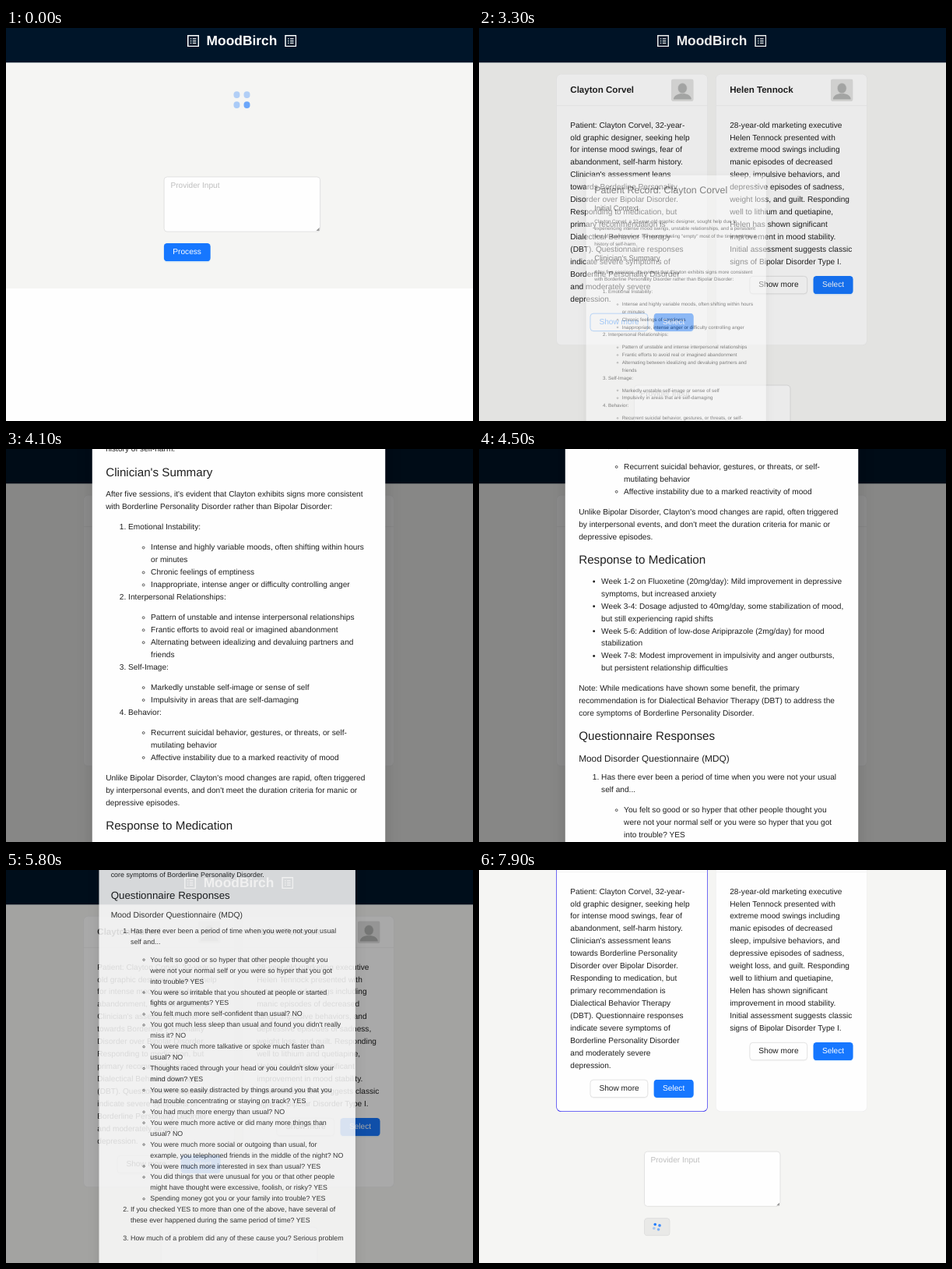
Write an HTML page that moves like this. It is 600 px wide and 504 px high and loops after 8 s.

```html
<!DOCTYPE html>
<html lang="en">
<head>
<meta charset="utf-8">
<style>
html, body { margin: 0; width: 600px; height: 504px; overflow: hidden; background: #fefefe; }
* { box-sizing: border-box; }
#stage {
  position: absolute; left: 0; top: 0; width: 830px; height: 700px; overflow: hidden;
  transform: translateY(-2px) scale(.724); transform-origin: 0 0;
  color: rgba(0,0,0,.88); white-space: nowrap;
  font: 14px/1.5714 "Liberation Sans", Arial, sans-serif; text-rendering: geometricPrecision;
}
#page, #mask, #modal, .card, .abs { position: absolute; }
#page { left: 0; top: 0; width: 830px; height: 833px; }
#back { left: 0; top: 0; width: 830px; background: #f5f5f3; }
#bar { left: 0; top: 0; width: 830px; height: 64px; background: #001529; }
#brand { left: 316px; top: 0; width: 194px; color: #fff; }
#brand b { position: absolute; left: 0; width: 194px; top: 7px; text-align: center; font-size: 24px; }
#brand svg { position: absolute; top: 14.5px; width: 21.5px; height: 21.5px; }
.card { top: 85px; width: 267px; height: 479px; border-radius: 8px; background: #fefefe; box-shadow: 0 0 0 1px #f0f0f0; }
.card.on { box-shadow: 0 0 0 1px #4038f0; }
.head { height: 56px; margin-bottom: -1px; padding: 0 24px; border-bottom: 1px solid #f0f0f0; display: flex; align-items: center; justify-content: space-between; font-weight: bold; font-size: 16px; }
.body { padding: 24px; }
.row { display: flex; justify-content: flex-end; gap: 10px; margin-top: 14px; }
.btn { height: 32px; padding: 4px 15px; border: 1px solid #d9d9d9; border-radius: 6px; background: #fefefe; box-shadow: 0 2px 0 rgba(0,0,0,.02); }
.btn.hover { color: #4096ff; border-color: #4096ff; }
.btn.main { color: #fff; border-color: transparent; background: #1677ff border-box; box-shadow: 0 2px 0 rgba(5,145,255,.1); }
.btn.main.hover { background-color: #4096ff; }
.pick.hover { box-shadow: 0 1px 7px rgba(40,90,150,.35) !important; }
#area { height: 98px; padding: 4px 11px; border: 1px solid #d9d9d9; border-radius: 6px; background: #fefefe; color: rgba(0,0,0,.25); }
#area::after { content: ""; position: absolute; right: 2px; top: 90px; width: 6px; height: 6px; background: linear-gradient(135deg, transparent 55%, #999 56%); }
#go { top: 118px; left: 0; }
#busy { top: 118px; left: 0; width: 46px; height: 32px; border-radius: 6px; background: #e9e9e7; box-shadow: inset 0 0 0 1px #d9d9d9; }
.spin i { position: absolute; border-radius: 50%; background: #1677ff; }
#mask { inset: 0; background: rgba(0,0,0,.45); }
#modal { left: 153px; top: 100px; width: 520px; min-height: 2072px; padding: 20px 24px; border-radius: 8px; background: #fefefe; box-shadow: 0 6px 16px rgba(0,0,0,.08), 0 3px 6px -4px rgba(0,0,0,.12), 0 9px 28px 8px rgba(0,0,0,.05); }
#modal > svg { position: absolute; left: 485.5px; top: 22px; }
h1, h2, h3 { margin: 0 0 .5em; font-weight: normal; }
h1 { font-size: 2em; } h2 { font-size: 1.5em; } h3 { font-size: 1.17em; }
p, ol, ul { margin: 0 0 1em; }
ol, ul { padding-left: 40px; }
li ul { margin: 0; }
</style>
</head>
<body>
<svg width="0" height="0" style="position:absolute">
  <symbol id="sheet" viewBox="0 0 31 31">
    <path d="M2 2h27v27H2z" fill="none" stroke="#fff" stroke-width="3"/>
    <path d="M8 10h3m-3 5.5h3m-3 5.5h3m3-11h9m-9 5.5h9m-9 5.5h9" stroke="#fff" stroke-width="2.4"/>
  </symbol>
  <symbol id="face" viewBox="0 0 29 29">
    <rect width="29" height="29" rx="3.5" fill="#e1e1e0"/>
    <path d="M3 26.3c0-10 23-10 23 0z" fill="#b0b1b0"/>
    <ellipse cx="14.5" cy="12" rx="6" ry="6.7" fill="#b0b1b0" stroke="#e1e1e0" stroke-width=".6"/>
  </symbol>
</svg>
<div id="stage">
  <div id="page">
    <div id="back" class="abs"></div>
    <div id="bar" class="abs"></div>
    <div id="brand" class="abs">
      <svg style="left:0"><use href="#sheet"/></svg><b>MoodBirch</b><svg style="right:0"><use href="#sheet"/></svg>
    </div>
    <div id="cards"></div>
    <div id="loader" class="spin abs" style="left:418.5px;top:130px"></div>
    <div id="form" class="abs">
      <div id="area">Provider Input</div>
      <div id="go" class="btn main abs">Process</div>
      <div id="busy" class="abs"><div id="dots" class="spin abs" style="left:23px;top:16px"></div></div>
    </div>
  </div>
  <div id="mask"></div>
  <div id="modal"></div>
</div>
<script>
const $ = id => document.getElementById(id);
const br = s => s.replaceAll('|', '<br>');
const p = s => `<p>${br(s)}</p>`;
const ul = (...items) => `<ul>${items.map(s => `<li>${br(s)}</li>`).join('')}</ul>`;
const li = (s, ...sub) => `<li>${p(s)}${sub.length ? ul(...sub) : ''}</li>`;

const card = (id, x, name, text) => `<div class="card" id="${id}" style="left:${x}px">
  <div class="head">${name}<svg width="40" height="40"><use href="#face"/></svg></div>
  <div class="body">${br(text)}<div class="row"><div class="btn more">Show more</div><div class="btn main pick">Select</div></div></div></div>`;

$('cards').innerHTML =
  card('first', 138, 'Clayton Corvel', 'Patient: Clayton Corvel, 32-year-|old graphic designer, seeking help|for intense mood swings, fear of|abandonment, self-harm history.|Clinician\'s assessment leans|towards Borderline Personality|Disorder over Bipolar Disorder.|Responding to medication, but|primary recommendation is|Dialectical Behavior Therapy|(DBT). Questionnaire responses|indicate severe symptoms of|Borderline Personality Disorder|and moderately severe|depression.') +
  card('second', 421, 'Helen Tennock', '28-year-old marketing executive|Helen Tennock presented with|extreme mood swings including|manic episodes of decreased|sleep, impulsive behaviors, and|depressive episodes of sadness,|weight loss, and guilt. Responding|well to lithium and quetiapine,|Helen has shown significant|improvement in mood stability.|Initial assessment suggests classic|signs of Bipolar Disorder Type I.');

$('modal').innerHTML = `<svg width="13" height="13"><path d="M1 1l11 11m0-11l-11 11" stroke="#8c8c8c" stroke-width="1.5"/></svg>
<h1>Patient Record: Clayton Corvel</h1>
<h2>Initial Context</h2>
${p('Clayton Corvel, a 32-year-old graphic designer, sought help due to|experiencing intense mood swings, unstable relationships, and a persistent|fear of abandonment. He reports feeling "empty" most of the time and has a|history of self-harm.')}
<h2>Clinician's Summary</h2>
${p("After five sessions, it's evident that Clayton exhibits signs more consistent|with Borderline Personality Disorder rather than Bipolar Disorder:")}
<ol>
${li('Emotional Instability:', 'Intense and highly variable moods, often shifting within hours|or minutes', 'Chronic feelings of emptiness', 'Inappropriate, intense anger or difficulty controlling anger')}
${li('Interpersonal Relationships:', 'Pattern of unstable and intense interpersonal relationships', 'Frantic efforts to avoid real or imagined abandonment', 'Alternating between idealizing and devaluing partners and|friends')}
${li('Self-Image:', 'Markedly unstable self-image or sense of self', 'Impulsivity in areas that are self-damaging')}
${li('Behavior:', 'Recurrent suicidal behavior, gestures, or threats, or self-|mutilating behavior', 'Affective instability due to a marked reactivity of mood')}
</ol>
${p("Unlike Bipolar Disorder, Clayton's mood changes are rapid, often triggered|by interpersonal events, and don't meet the duration criteria for manic or|depressive episodes.")}
<h2>Response to Medication</h2>
${ul('Week 1-2 on Fluoxetine (20mg/day): Mild improvement in depressive|symptoms, but increased anxiety', 'Week 3-4: Dosage adjusted to 40mg/day, some stabilization of mood,|but still experiencing rapid shifts', 'Week 5-6: Addition of low-dose Aripiprazole (2mg/day) for mood|stabilization', 'Week 7-8: Modest improvement in impulsivity and anger outbursts,|but persistent relationship difficulties')}
${p('Note: While medications have shown some benefit, the primary|recommendation is for Dialectical Behavior Therapy (DBT) to address the|core symptoms of Borderline Personality Disorder.')}
<h2>Questionnaire Responses</h2>
<h3>Mood Disorder Questionnaire (MDQ)</h3>
<ol>
${li('Has there ever been a period of time when you were not your usual|self and...', 'You felt so good or so hyper that other people thought you|were not your normal self or you were so hyper that you got|into trouble? YES', 'You were so irritable that you shouted at people or started|fights or arguments? YES', 'You felt much more self-confident than usual? NO', "You got much less sleep than usual and found you didn't really|miss it? NO", 'You were much more talkative or spoke much faster than|usual? NO', "Thoughts raced through your head or you couldn't slow your|mind down? YES", 'You were so easily distracted by things around you that you|had trouble concentrating or staying on track? YES', 'You had much more energy than usual? NO', 'You were much more active or did many more things than|usual? NO', 'You were much more social or outgoing than usual, for|example, you telephoned friends in the middle of the night? NO', 'You were much more interested in sex than usual? YES', 'You did things that were unusual for you or that other people|might have thought were excessive, foolish, or risky? YES', 'Spending money got you or your family into trouble? YES')}
${li('If you checked YES to more than one of the above, have several of|these ever happened during the same period of time? YES')}
${li('How much of a problem did any of these cause you? Serious problem')}
</ol>`;

const clamp = x => Math.max(0, Math.min(1, x));
const ramp = (t, a, b) => clamp((t - a) / (b - a));
const show = (el, on) => el.style.display = on ? '' : 'none';

// Piecewise linear path through [time, value] points
function path(t, pts) {
  let v = pts[0][1];
  for (let i = 1; i < pts.length; i++)
    v += (pts[i][1] - pts[i - 1][1]) * ramp(t, pts[i - 1][0], pts[i][0]);
  return v;
}

function makeSpin(el, half, r) {
  el.innerHTML = '<i></i>'.repeat(4);
  const dots = [...el.children];
  return age => dots.forEach((d, i) => {
    const a = (age * .3 - 90 + i * 90) * Math.PI / 180, R = half * Math.SQRT2;
    const k = Math.max(0, age / 1000 - i * .4) % 2;
    d.style.cssText = `width:${2 * r}px;height:${2 * r}px;left:${R * Math.cos(a) - r}px;top:${R * Math.sin(a) - r}px;opacity:${.3 + .7 * (k < 1 ? k : 2 - k)}`;
  });
}
const spinPage = makeSpin($('loader'), 9, 5.7);
const spinButton = makeSpin($('dots'), 4, 2.4);
const more = document.querySelector('.more'), pick = document.querySelector('.pick');

function draw(t) {
  const loading = t < 1000, busy = t >= 6800;
  $('page').style.transform = `translateY(${-134 * ramp(t, 6400, 6600)}px)`;
  $('back').style.height = loading ? '464px' : '833px';
  $('brand').style.transform = loading ? 'translateX(5.5px)' : '';
  show($('cards'), !loading);
  show($('loader'), loading);
  spinPage(t + 450);

  $('form').style.left = (loading ? 280 : busy ? 292.5 : 274.5) + 'px';
  $('form').style.top = (loading ? 266 : 635) + 'px';
  $('area').style.width = busy ? '242px' : '278px';
  show($('go'), !busy);
  show($('busy'), busy);
  spinButton(t - 6800);

  more.classList.toggle('hover', t >= 3100 && t < 3500);
  pick.classList.toggle('hover', t >= 6100 && t < 6700);
  $('go').classList.toggle('hover', t >= 6700);
  $('first').classList.toggle('on', t >= 6200);

  const fade = ramp(t, 3250, 3550) - ramp(t, 5750, 5950);
  const zoom = t < 5000 ? 1 - (1 - fade) ** 4 : fade * fade * (3 - 2 * fade);
  const y = path(t, [[3850, 0], [4500, 765.5], [4900, 1189], [5000, 1264], [5100, 1298]]);
  const modal = $('modal').style;
  $('mask').style.opacity = fade;
  modal.opacity = zoom;
  modal.transformOrigin = `96px ${425 + y}px`;
  modal.transform = `translateY(${-y}px) scale(${.2 + .8 * zoom})`;
}

function tick() {
  draw(Math.floor((performance.now() + 10) % 8000 / 100) * 100);
  requestAnimationFrame(tick);
}
tick();
</script>
</body>
</html>
```
